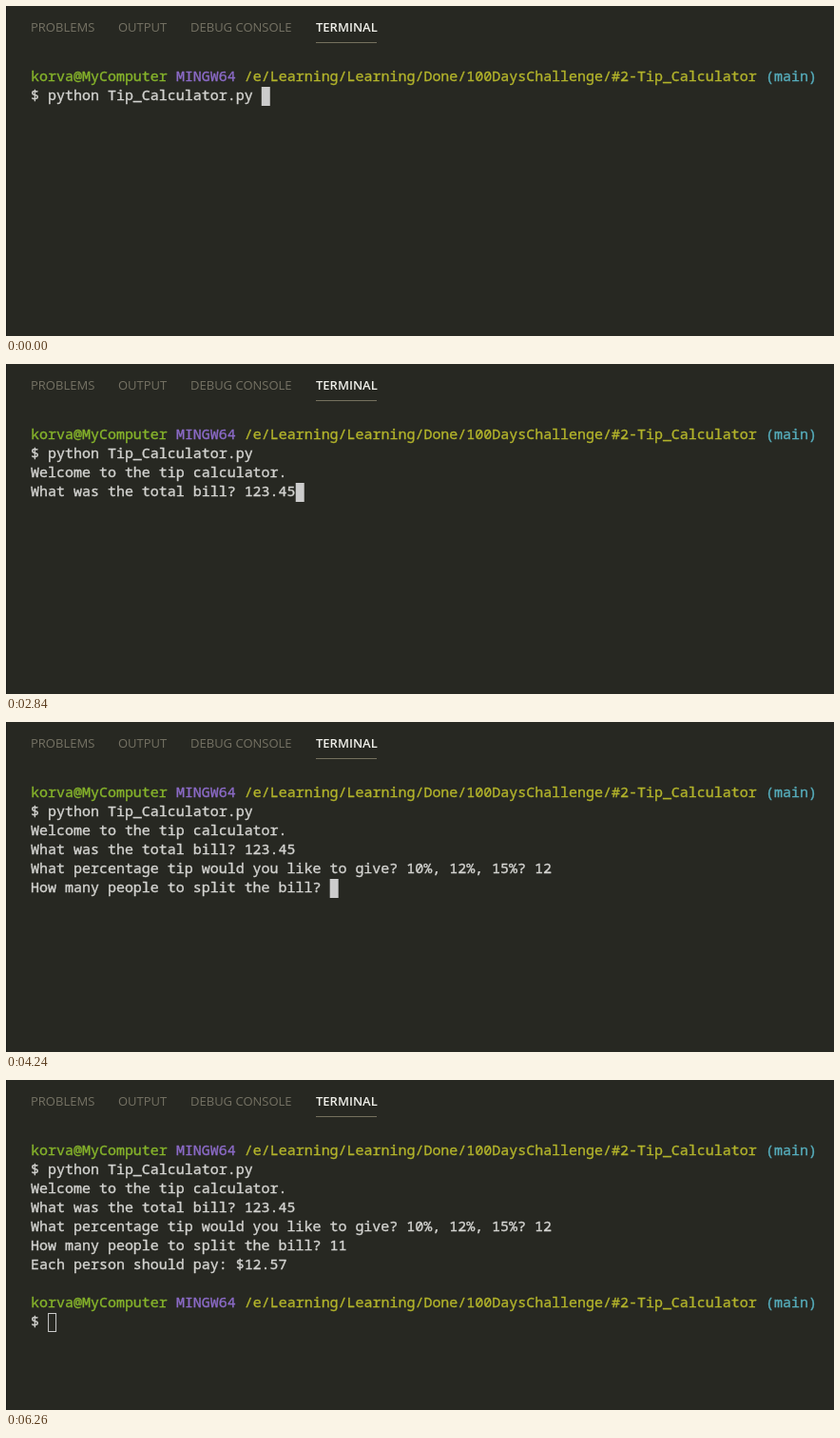
Write an HTML page with a canvas that moves like this. It is 871 px wide and 347 px high and loops after 6460 ms.

```html
<!DOCTYPE html>
<html lang="en">
<head>
<meta charset="utf-8">
<title>Tip calculator</title>
<style>
html, body { margin: 0; width: 100%; height: 100%; overflow: hidden; background: #272822; }
canvas { display: block; }
</style>
</head>
<body>
<canvas id="stage" width="871" height="347"></canvas>
<script>
const ctx = document.getElementById('stage').getContext('2d');
const LOOP = 6460;
const LEFT = 26.1, TOP = 65, CELL = 8.988, ROW = 20;
const FG = '#d4d4d1', CURSOR = '#cccccc';
const MONO = '14.98px "Noto Sans Mono", "DejaVu Sans Mono", monospace';
const SANS = '13px "Open Sans", "Noto Sans", sans-serif';

const PROMPT = [
  ['korva@MyComputer', '#86b42b'],
  ['MINGW64', '#8c6bc8'],
  ['/e/Learning/Learning/Done/100DaysChallenge/#2-Tip_Calculator', '#b3b42b'],
  ['(main)', '#56adbc']
];

// Terminal output: [time, text]; the cursor follows the last character.
const OUTPUT = [
  [0, '$ python Tip_Calculator.py '],
  [1410, '\nWelcome to the tip calculator.\nWhat was the total bill? '],
  [2010, '12'], [2220, '3'], [2420, '.'], [2620, '4'], [2840, '5'],
  [3240, '\nWhat percentage tip would you like to give? 10%, 12%, 15%? '],
  [3650, '1'], [3830, '2'],
  [4030, '\n'],
  [4240, 'How many people to split the bill? '],
  [4660, '1'], [4840, '1'],
  [5040, '\nEach person should pay: $12.57\n'],
  [5250, '\n@\n$ ']
];
const BLUR = 6260;

function put(text, x, y, font, color) {
  ctx.font = font;
  ctx.fillStyle = color;
  ctx.fillText(text, x, y);
}

// A hairline outline gives the terminal text its sturdier strokes.
function cells(text, col, row, color) {
  const x = LEFT + col * CELL, y = TOP + row * ROW + 14;
  put(text, x, y, MONO, color);
  ctx.strokeStyle = color;
  ctx.lineWidth = 0.35;
  ctx.strokeText(text, x, y);
}

function prompt(row) {
  let col = 0;
  for (const [text, color] of PROMPT) {
    cells(text, col, row, color);
    col += text.length + 1;
  }
}

function cursor(col, row, hollow) {
  const x = LEFT + col * CELL, y = TOP + row * ROW;
  if (hollow) {
    ctx.strokeStyle = CURSOR;
    ctx.lineWidth = 1;
    ctx.strokeRect(x + 0.5, y + 0.5, CELL - 1, ROW - 1);
  } else {
    ctx.fillStyle = CURSOR;
    ctx.fillRect(x, y, CELL, ROW);
  }
}

function panel() {
  ctx.fillStyle = '#272822';
  ctx.fillRect(0, 0, 871, 347);
  ctx.fillStyle = '#1e1f1c';
  ctx.fillRect(0, 0, 1, 347);
  put('PROBLEMS', 26, 27, SANS, '#757264');
  put('OUTPUT', 118, 27, SANS, '#757264');
  put('DEBUG CONSOLE', 194, 27, SANS, '#757264');
  put('TERMINAL', 326, 27, '600 ' + SANS, '#f0f0ea');
  ctx.fillStyle = '#75715e';
  ctx.fillRect(326, 38, 64, 1);
}

function draw(t) {
  panel();
  prompt(0);
  const lines = OUTPUT.filter(([at]) => at <= t).map(([, text]) => text).join('').split('\n');
  lines.forEach((line, i) => {
    if (line === '@') prompt(i + 1);
    else cells(line, 0, i + 1, FG);
  });
  cursor(lines[lines.length - 1].length, lines.length, t >= BLUR);
}

const start = performance.now();
function tick() {
  draw((performance.now() - start) % LOOP);
  requestAnimationFrame(tick);
}
tick();
</script>
</body>
</html>
```
